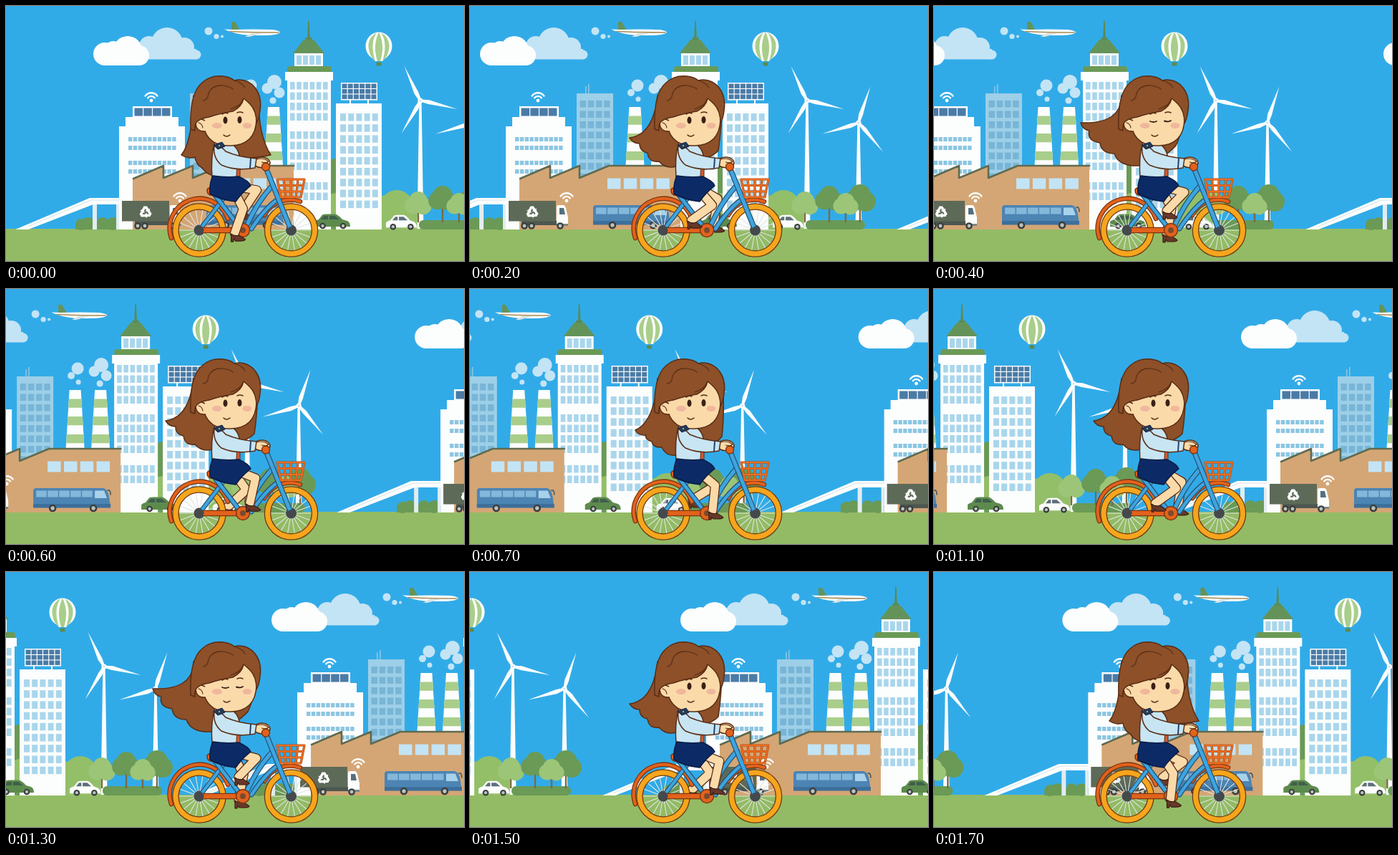
An HTML page for the animation above (1.8 s loop, 640x356 px).

```html
<!DOCTYPE html>
<html lang="en">
<head>
<meta charset="utf-8">
<title>City ride</title>
<style>
html, body { margin: 0; width: 100%; height: 100%; overflow: hidden; background: #31abe8; }
svg { display: block; width: 100vw; height: 100vh; }
</style>
</head>
<body>
<svg viewBox="0 0 640 356">
  <rect width="640" height="356" fill="#31abe8"/>
  <rect y="311" width="640" height="45" fill="#93bb65"/>
  <g id="scroll"><g id="city"></g><use href="#city" x="691"/></g>
  <g id="rider"></g>
</svg>
<script>
const LOOP = 1800, STEP = 100;
const WHITE = '#fcfdfd', PALE = '#c3e4f5', GLASS = '#a9d6ec', PANEL = '#4a7ba6';
const DARK = '#6a9a56', LIGHT = '#93bf68', LEAF = '#a9ce8b', ROOF = '#5f6a50';
const BROWN = '#8d5029', LINE = '#592d14', SKIN = '#fbdaaa', ORANGE = '#e2621c', BLUE = '#3ea5de';
const $ = id => document.getElementById(id);

// ---- shape helpers
const rect = (x, y, w, h, f, r = 0) => `<rect x="${x}" y="${y}" width="${w}" height="${h}" rx="${r}" fill="${f}"/>`;
const oval = (x, y, rx, ry, f, more = '') => `<ellipse cx="${x}" cy="${y}" rx="${rx}" ry="${ry}" fill="${f}" ${more}/>`;
const dot = (x, y, r, f, more) => oval(x, y, r, r, f, more);
const dots = (f, list) => list.map(([x, y, r]) => dot(x, y, r, f)).join('');
const area = (d, f, s = 'none', w = 1.5) => `<path d="${d}" fill="${f}" stroke="${s}" stroke-width="${w}" stroke-linejoin="round"/>`;
const line = (d, s, w = 1.5) => `<path d="${d}" fill="none" stroke="${s}" stroke-width="${w}" stroke-linecap="round" stroke-linejoin="round"/>`;
const tube = (d, w, f, edge) => line(d, w + 2.6 && edge, w + 2.6) + line(d, f, w);
const grid = (x, y, cols, rows, dx, dy, w, h, f) => {
  let s = '';
  for (let r = 0; r < rows; r++)
    for (let c = 0; c < cols; c++) s += rect(x + c * dx, y + r * dy, w, h, f);
  return s;
};

// ---- city parts
const wifi = (x, y) => dot(x, y, 2.4, WHITE) +
  [6, 10.5].map(r => line(`M${x - r * .8} ${y - r * .62}A${r} ${r} 0 0 1 ${x + r * .8} ${y - r * .62}`, WHITE, 2.4)).join('');

const turbine = (x, y, angles) =>
  area(`M${x - 1.6} ${y}H${x + 1.6}L${x + 4.5} 311H${x - 4.5}Z`, WHITE) +
  angles.map(a => `<g transform="translate(${x} ${y}) rotate(${a})">${area('M0 -1.5L12 -3.6L53 0L12 2.4L0 1.5Z', WHITE)}</g>`).join('') +
  dot(x, y, 3.6, WHITE) + dot(x, y, 1.5, '#cfe3ee');

const tree = (x, y, r, f) => rect(x - 1.2, y, 2.4, 302 - y, '#7b6a45') +
  dots(f, [[x - r * .4, y + r * .15, r * .7], [x + r * .4, y + r * .2, r * .7], [x, y - r * .25, r * .75]]);

const stack = (x) => {
  let s = area(`M${x - 8} 141H${x + 8}L${x + 13} 223H${x - 13}Z`, WHITE);
  for (const y of [153.5, 178, 203]) {
    const a = 8 + (y - 141) * .061, b = a + .75;
    s += area(`M${x - a} ${y}H${x + a}L${x + b} ${y + 12.3}H${x - b}Z`, LEAF);
  }
  return s;
};

const wheel = (x, y, r) => dot(x, y, r, '#3a3f3c') + dot(x, y, r * .5, '#b9c2c2');

const car = (x, w, body, glass) =>
  area(`M${x} 307V301Q${x + 2} 299 ${x + 6} 298L${x + 11} 291.5Q${x + 13} 290.5 ${x + 17} 290.5H${x + w * .58}Q${x + w * .66} 291 ${x + w * .78} 298L${x + w - 4} 300Q${x + w} 302 ${x + w} 308H${x}Z`, body) +
  area(`M${x + 9} 298L${x + 13} 293H${x + w * .38}V298Z`, glass) +
  area(`M${x + w * .42} 298V293H${x + w * .57}L${x + w * .7} 298Z`, glass) +
  wheel(x + w * .23, 307, 4.3) + wheel(x + w * .8, 307, 4.3);

const recycle = (x, y) => [0, 120, 240].map(a => `<g transform="translate(${x} ${y}) rotate(${a})">` +
  area('M-5.5 -3L-2.5 -8.5H2L4.5 -4.5L6.3 -5.6L5 0L-.5 -1.7L1.3 -2.8L-.2 -5.3L-2.7 -1.2Z', WHITE) + '</g>').join('');

const sky = () =>
  dots(PALE, [[200, 56, 14], [225, 52, 22], [249, 58, 14], [266, 68, 6.5]]) + rect(186, 60, 80, 14.5, PALE) +
  dots(WHITE, [[138, 67, 16], [150, 62, 13], [170, 62, 20], [186, 69, 14]]) + rect(134, 64, 54, 19, WHITE, 4) +
  dots(PALE, [[283, 35, 5.5], [294, 42.5, 3.6], [302, 42.5, 2]]) +
  area('M315 34L315 22H320L327 34Z', '#64935a') +
  area('M305 32.5L318 33Q345 32 372 33Q383 34.5 383 37Q380 40.5 364 41H340Q318 39 305 32.5Z', WHITE) +
  line('M313 35.5Q345 37 381 37', '#a88c55', 1.6) + area('M343 38H358L340 43H334Z', '#d9e3e4') +
  oval(521, 56, 18.5, 19.5, WHITE) + area('M506 66H536L526 77H516Z', WHITE) +
  area('M518 37Q500 48 510 70L516 77Q508 52 518 37ZM524 37Q542 48 532 70L526 77Q534 52 524 37Z', LEAF) +
  area('M521 36.5Q512 55 519 77H523Q530 55 521 36.5Z', LEAF) +
  rect(517.5, 78.5, 7, 5, '#5d8a50', 1);

const nature = () =>
  rect(448, 213, 26, 99, DARK, 12) + dots(LIGHT, [[462, 283, 22], [546, 280, 23], [531, 284, 20], [565, 287, 18]]) + rect(520, 284, 56, 28, LIGHT) +
  turbine(579, 132, [-115, 13, 120]) + turbine(651, 163, [-72, 50, 163]) +
  rect(577, 299, 83, 13, DARK, 6) +
  tree(576, 276, 17, '#9cc578') + tree(610, 269, 18, DARK) + tree(653, 269, 20, DARK) + tree(633, 277, 16, '#9cc578');

const offices = () =>
  // antenna block
  rect(269, 112, 1.6, 12, '#8fc5e0') + rect(273, 109, 1.6, 15, '#8fc5e0') +
  rect(257, 122, 51, 190, '#9dcfe8') + grid(261.5, 132, 4, 8, 11.2, 14.5, 8.5, 9.5, '#78b5d6') +
  // low office
  rect(177, 140, 55, 17, WHITE) + grid(179.5, 142.5, 4, 1, 12.8, 0, 11.6, 11, PANEL) +
  rect(167, 155, 74, 14, WHITE) + rect(158, 168, 92, 144, WHITE) +
  [183, 195, 216, 228].map(y => grid(171, y, 10, 1, 6.8, 0, 5.4, 6, '#8cc6e2')).join('') + wifi(203, 132) +
  // chimneys
  stack(338.5) + stack(374) +
  dots(PALE, [[342, 111, 8.5], [333, 121, 5], [343, 130, 3.5], [375, 106, 10], [365, 115, 7.5], [382, 121, 7.5], [373, 132, 4.6]]) +
  // tall tower
  area('M421.8 48L423 21L424.2 48Z', '#5c8a50', '#5c8a50') + rect(418.5, 44, 9, 4, '#5c8a50') +
  area('M401 66L416 47H430L445 66Z', '#64935a') + rect(403, 66, 40, 19, WHITE) + grid(406, 69, 4, 1, 9, 0, 7, 13, GLASS) +
  rect(393, 84, 62, 9, DARK, 4) + rect(390, 92, 67, 12, WHITE) + rect(393, 103, 61, 209, WHITE) +
  [[106, 4], [175, 4], [246, 2]].map(([y, n]) => grid(397, y, 6, n, 9.2, 14.5, 6.6, 10.5, GLASS)).join('') +
  // solar block
  rect(480, 130, 2, 8, WHITE) + rect(505, 130, 2, 8, WHITE) + rect(468, 107, 51, 24.5, WHITE) +
  grid(469.5, 108.5, 6, 3, 8.2, 7.5, 7, 6.4, PANEL) +
  rect(461, 136, 64, 176, WHITE) + grid(467, 150, 5, 9, 11.2, 15.2, 8, 10.5, GLASS);

const street = () =>
  // ramp
  dots(DARK, [[105, 305, 8], [115, 303, 8], [135, 303, 8], [149, 304, 9]]) + rect(97, 303, 61, 9, DARK) +
  rect(121, 275, 6, 37, '#e3ecef') + rect(154, 275, 4, 37, '#e3ecef') +
  area('M13 312L117 268H162V277H122L31 312Z', WHITE) + line('M30 308L119 271H158', '#d4e3e9', 1) +
  // factory
  area('M177 312V241L220 223V241L261 223V241L302 223H402V312Z', '#d4a675') +
  line('M178 241L220 223V240L261 223V240L302 223H402', ROOF, 2.6) + grid(300, 240.5, 4, 1, 22.8, 0, 18.5, 15, PALE) +
  // bus
  area('M280 282Q280 278 284 278H378Q384 279 386 291L388 305H280Z', '#4c84b3') + rect(280, 300, 108, 5.5, '#3d6f9c') +
  grid(284, 281.5, 5, 1, 16, 0, 14.6, 9, '#84b8db') + area('M366 281.5H379L383 292H366Z', '#a8d2ea') +
  line('M384 281Q388 280 388 287', '#4d5a60', 1.6) + wheel(307, 306, 5.3) + wheel(364, 306, 5.3) +
  // truck
  rect(180, 300, 62, 6, '#4d5750') + rect(162, 272, 66, 28.5, '#5e6a58') + recycle(195, 288) +
  area('M229 306V280Q229 278 232 278H239Q242 279 243 287L245 295V306Z', WHITE) + area('M233 282H239L241 291H233Z', '#56707e') +
  rect(229, 304, 16, 3, '#7d8884') + wheel(184, 307, 4.8) + wheel(194, 307, 4.8) + wheel(234, 307, 4.8) + wifi(243, 272) +
  car(431, 50, '#5d8a4d', '#3f5f4c') +
  `<g transform="translate(0 1.2)">${car(531, 43, WHITE, '#5d7078')}</g>`;

$('city').innerHTML = sky() + nature() + offices() + street();

// ---- rider parts
const bikeWheel = x => {
  let s = '';
  for (let i = 0; i < 18; i++) {
    const a = i * Math.PI / 9;
    s += line(`M${x} 313L${x + 29 * Math.cos(a)} ${313 + 29 * Math.sin(a)}`, '#dfe5e2', 1.1);
  }
  return s + dot(x, 313, 33, 'none', 'stroke="#6f3a12" stroke-width="9.6"') +
    dot(x, 313, 33, 'none', 'stroke="#f6a51d" stroke-width="7"') + dot(x, 313, 7.5, '#45494c');
};

const bike = () =>
  bikeWheel(270) + bikeWheel(398.5) +
  tube('M231 324A40.5 40.5 0 0 1 310 297', 4, ORANGE, '#7d3510') + tube('M361 292A41 41 0 0 1 411 273', 4, ORANGE, '#7d3510') +
  tube('M303 270L271 312', 4, BLUE, '#27567c') + tube('M292 264L328 311', 4.5, BLUE, '#27567c') +
  tube('M373 250Q352 272 336 307', 5, BLUE, '#27567c') + tube('M381 269Q362 282 343 311', 4.5, BLUE, '#27567c') +
  tube('M364 228L398 312', 5, BLUE, '#27567c') + dot(398.5, 313, 5, '#45494c') +
  tube('M270 313H331', 6, ORANGE, '#7d3510') + dot(270, 313, 6.5, '#45494c') + dot(331, 313, 9.5, ORANGE, 'stroke="#7d3510" stroke-width="1.4"') + dot(331, 313, 4, '#7c4a2c') +
  area('M281 257Q282 252 293 254L308 260Q300 266 285 264Q281 262 281 257Z', ORANGE, '#7d3510') +
  line('M379 242H417L412 267H384Z M388 242L391 267M398 242V267M408 242L405 267M380 250.5H415.5M382 259H414', '#a84812', 3.2) +
  line('M379 242H417L412 267H384Z M388 242L391 267M398 242V267M408 242L405 267M380 250.5H415.5M382 259H414', '#ee6d20', 1.9);

const leg = id => `<g id="${id}"><g class="limb">${line('', LINE, 13.5)}${line('', SKIN, 11)}</g>` +
  `<g class="shoe">${area('M-10 -5Q-5 -1 1 -3Q8 1 10 3Q9 5 3 5H-4L-6 2L-7 6H-10Z', '#67382a', '#3d1d12', 1.2)}</g></g>`;

const torso = () =>
  area('M291 192Q300 186 314 192Q326 198 327 215L326 240H288Q286 212 291 192Z', '#c8e5f3', LINE) +
  area('M323 214L327 216V240L322 238Z', '#d9572d', LINE, 1) +
  area('M289 237Q308 240 325 238Q339 244 342 251Q330 260 321 273Q300 271 285 262Q284 248 289 237Z', '#0c2b66', '#081b45');

const arm = () =>
  area('M349 213Q358 209 365 213Q371 217 368 222Q358 229 348 223Z', SKIN, LINE) +
  area('M291 196Q298 192 307 203Q325 211 350 213L348 226Q322 231 301 222Q289 212 291 196Z', '#c8e5f3', LINE) +
  line('M342 213L341 226', '#24436f', 2) + area('M290 194L302 190L306 196L296 200Z', '#253a58', '#182640', 1) +
  dot(298, 195, 1.1, '#f1c453') + dot(363, 224.5, 5.5, ORANGE, 'stroke="#7d3510" stroke-width="1.4"') +
  area('M350 214Q360 211 367 217Q364 220 357 218', SKIN, LINE, 1.2);

const head = () =>
  area('M274 150Q274 197 314 195Q349 194 350 158Q352 122 314 120Q275 120 274 150Z', SKIN, LINE) +
  area('M278 160Q267 154 265 164Q266 176 279 175', SKIN, LINE) + line('M269 163Q274 164 275 170', LINE, 1.2) +
  oval(295, 167, 7, 4, '#efb79c') + oval(337, 167, 6.5, 4, '#efb79c') +
  `<g id="open">${oval(306.5, 159.5, 3, 5, '#3b2016')}${oval(326.5, 159, 3, 5, '#3b2016')}</g>` +
  `<g id="shut">${line('M302 161Q306.5 163 311 161M322 160.5Q327 162.5 331 160', '#3b2016', 1.9)}</g>` +
  line('M302 151Q306 148 310 150M323 149Q327 147 331 149', LINE, 1.6) + line('M304 180Q308 184 313 180', LINE, 1.5) +
  area('M258 172Q256 122 274 107Q286 96 303 98Q313 99 319 104Q336 100 348 114Q358 127 355 146Q354 156 350 164Q350 146 341 137Q336 132 332 129Q330 140 317 147Q298 150 284 155Q272 157 269 160Q263 163 264 174Z', BROWN, LINE) +
  line('M275 132Q282 132 283 122Q288 110 303 111Q312 112 317 116M332 129Q328 140 314 144M319 104Q330 107 334 114', LINE, 1.2);

$('rider').innerHTML = area('', BROWN, LINE).replace('<path', '<path id="hair"') + leg('far') + bike() +
  leg('near') + torso() + head() + arm();

// ---- motion
const pairs = s => s.split(' ').map(p => p.split(',').map(Number));
const hairPoses = [
  '262,125 260,190 245,208 254,214 264,211 266,222 274,226 280,234 287,236 310,240 335,212 352,212 370,208 352,180 353,125',
  '262,125 258,185 231,197 235,205 246,204 244,210 254,213 256,222 268,221 274,234 288,232 340,222 352,206 356,170 353,125',
  '262,125 256,180 223,184 228,192 237,192 237,203 248,205 250,219 264,217 274,228 288,224 335,215 347,202 352,170 352,125',
  '262,125 262,165 205,163 208,173 217,174 213,188 232,191 234,206 252,206 258,224 286,223 320,215 338,195 350,170 352,125'
].map(pairs);
const swing = [0, 1, 2, 2.6, 3];
const path = [[0, 0], [100, 56], [200, 108], [300, 151], [400, 185], [1100, 384], [1300, 442], [1400, 473], [1500, 519], [1800, 691]];

const mix = (a, b, u) => a + (b - a) * u;

function scrollAt(t) {
  const i = path.findIndex(p => p[0] > t), [t0, x0] = path[i - 1], [t1, x1] = path[i];
  return mix(x0, x1, (t - t0) / (t1 - t0));
}

function hairAt(pose) {
  const i = Math.min(2, Math.floor(pose)), u = pose - i;
  const p = hairPoses[i].map(([x, y], n) => mix(x, hairPoses[i + 1][n][0], u) + ' ' + mix(y, hairPoses[i + 1][n][1], u));
  let d = 'M' + p[0];
  for (let n = 1; n < p.length; n += 2) d += `Q${p[n]} ${p[n + 1]}`;
  return d + 'Z';
}

function poseLeg(id, turn) {
  const a = turn * 2 * Math.PI, hx = 315, hy = 251, len = 36;
  const sx = 330 + 16 * Math.sin(a), sy = 308 - 16 * Math.cos(a);
  const ax = sx - 5, ay = sy - 6, dx = ax - hx, dy = ay - hy, dist = Math.hypot(dx, dy);
  const bend = Math.sqrt(Math.max(0, len * len - dist * dist / 4)) / dist;
  const kx = hx + dx / 2 + dy * bend, ky = hy + dy / 2 - dx * bend;
  const g = $(id);
  for (const p of g.querySelectorAll('.limb path')) p.setAttribute('d', `M${hx} ${hy}L${kx} ${ky}L${ax} ${ay}`);
  g.querySelector('.shoe').setAttribute('transform', `translate(${sx} ${sy})`);
}

function draw() {
  const k = Math.floor(performance.now() % LOOP / STEP), beat = k % 9;
  $('scroll').setAttribute('transform', `translate(${-scrollAt(k * STEP)} 0)`);
  $('hair').setAttribute('d', hairAt(swing[4 - Math.abs(4 - beat)]));
  poseLeg('near', (beat + 5) / 9);
  poseLeg('far', (beat + 5) / 9 + .5);
  $('open').style.display = beat === 4 ? 'none' : '';
  $('shut').style.display = beat === 4 ? '' : 'none';
  requestAnimationFrame(draw);
}
draw();
</script>
</body>
</html>
```
